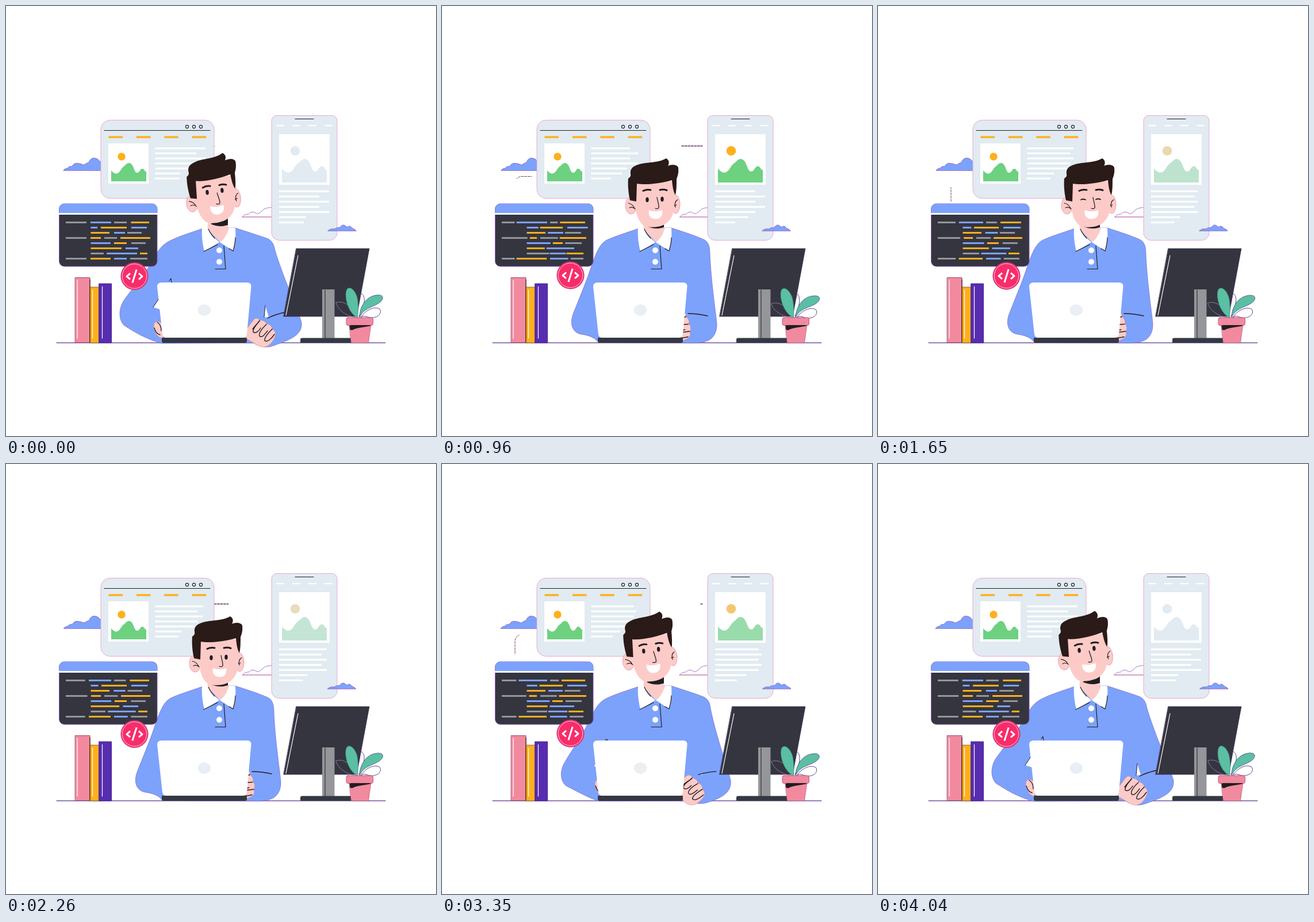
Recreate the animation shown at these times as an HTML page with a canvas. Size 748 by 748 pixels, loop 4080 ms.

```html
<!DOCTYPE html>
<html lang="en">
<head>
<meta charset="utf-8">
<title>Developer at work</title>
<style>
html, body { margin: 0; width: 100%; height: 100%; overflow: hidden; background: #fff; }
canvas { display: block; width: 748px; height: 748px; }
</style>
</head>
<body>
<canvas id="stage" width="748" height="748"></canvas>
<script>
const ctx = document.getElementById('stage').getContext('2d');
const LOOP = 4080, HALF = LOOP / 2;
const BLUE = '#7ca2fc', ORANGE = '#fdb01c', GREY = '#949699', DARK = '#353540', INK = '#211d22';
const PALE = '#e1ebf1', SKIN = '#fdcbc7', HAIR = '#2a1a18', PINK = '#f28a9f', GREEN = '#6dd180';
const LEAF = '#5abfa3', EDGE = '#8453bd', ROSE = '#ee9fce', WHITE = '#fff';

const lerp = (a, b, p) => a + (b - a) * p;
const clamp = p => Math.max(0, Math.min(1, p));
const smooth = p => (p = clamp(p), p * p * (3 - 2 * p));

function key(t, k) {
  for (let i = 2; i < k.length; i += 2)
    if (t < k[i]) return lerp(k[i - 1], k[i + 1], clamp((t - k[i - 2]) / (k[i] - k[i - 2])));
  return k[k.length - 1];
}

function blend(a, b, p) {
  return 'rgb(' + a.map((v, i) => Math.round(lerp(v, b[i], p))) + ')';
}

function fill(d, color, edge, width = 0.8) {
  const path = new Path2D(d);
  ctx.fillStyle = color;
  ctx.fill(path);
  if (edge) line(path, edge, width);
}

function line(d, color = INK, width = 1.3) {
  ctx.strokeStyle = color;
  ctx.lineWidth = width;
  ctx.stroke(d instanceof Path2D ? d : new Path2D(d));
}

function box(x, y, w, h, color, r = 0, edge) {
  ctx.beginPath();
  ctx.roundRect(x, y, w, h, r);
  ctx.fillStyle = color;
  ctx.fill();
  if (edge) { ctx.strokeStyle = edge; ctx.lineWidth = 0.9; ctx.stroke(); }
}

function oval(x, y, rx, ry, color, edge, width = 0.8) {
  ctx.beginPath();
  ctx.ellipse(x, y, rx, ry, 0, 0, 7);
  ctx.fillStyle = color;
  ctx.fill();
  if (edge) { ctx.strokeStyle = edge; ctx.lineWidth = width; ctx.stroke(); }
}

function moved(x, y, draw) {
  ctx.save();
  ctx.translate(x, y);
  draw();
  ctx.restore();
}

function turned(x, y, deg, draw) {
  ctx.save();
  ctx.translate(x, y);
  ctx.rotate(deg * Math.PI / 180);
  ctx.translate(-x, -y);
  draw();
  ctx.restore();
}

function hills(x, y, scale, color) {
  moved(x, y, () => {
    ctx.scale(scale, scale);
    fill('M0 13C3 16 5 18.5 9 18.5C15 18.5 17 9 22 6C25 4 27 0 31 0C40 1 39 17 45 17C50 17 50 9 55 10C58 11 58 15 61 15V32H0Z', color);
  });
}

// Draws the stretch from a to b of a dashed route given by at(s).
function trail(at, a, b, color, width) {
  ctx.beginPath();
  for (let s = 0; s < b; s += 5.5) {
    const from = Math.max(s, a), to = Math.min(s + 3.7, b);
    if (to <= from) continue;
    ctx.moveTo(...at(from));
    ctx.lineTo(...at(to));
  }
  ctx.strokeStyle = color;
  ctx.lineWidth = width;
  ctx.stroke();
}

const across = s => [362 + s, 243.5];
function bend(s) {
  if (s < 25) return [164 - s, 296.5];
  const turn = (s - 25) / 12;
  if (turn < Math.PI / 2) return [139 - 12 * Math.sin(turn), 308.5 - 12 * Math.cos(turn)];
  return [127, 308.5 + s - 25 - 6 * Math.PI];
}

function trails(t) {
  const h = t % HALF;
  if (h < 1390) {
    const tail = key(h, [250, 0, 430, 9, 790, 38, 960, 54, 1310, 87, 1360, 91]);
    const head = key(h, [0, 0, 430, 48, 790, 82, 960, 91]);
    trail(across, tail, head, '#5c2a5e', 1.4);
  }
  if (h > 600) {
    const tail = key(h, [700, 6, 960, 8, 1310, 30, 1650, 51, 2000, 80]);
    const head = key(h, [600, 5, 790, 25, 960, 35, 1310, 66, 1650, 75, 1800, 80]);
    trail(bend, tail, head, '#6b4566', 1);
  }
}

function backClouds(sway) {
  moved(3 * sway, 0, () => {
    fill('M100 286C102 283 105 282 108 282C109 278 113 279 115 279C118 273 123 273 127 274C132 274 134 278 138 275C141 272 143 274 145 270C148 264 153 264 156 265C162 266 163 272 168 273V286Z', BLUE, EDGE);
    line('M411 367C414 363 418 362 422 362C426 357 431 358 434 360C438 363 441 360 445 357C449 351 456 351 466 350', EDGE, 0.8);
    line('M411 367H466', '#b0428f', 1.1);
  });
}

function frontCloud(sway) {
  moved(-3 * sway, 0, () =>
    fill('M560 391C563 388 568 387 572 388C575 384 579 387 582 384C585 379 590 381 592 384C594 386 596 381 600 384C602 388 607 387 609 391Z', BLUE, EDGE));
}

function browser(w) {
  box(165, 198.5, 197, 136, PALE, 16, ROSE);
  line('M171 216.5H355', INK, 1.1);
  for (const x of [315, 327, 339]) oval(x, 210, 2.6, 2.6, PALE, INK, 1.1);
  for (let i = 0; i < 4; i++) box(178.5 + 48.4 * i, 226.3, 24.5, 3.5, ORANGE);
  box(178, 239, 70, 70, WHITE);
  oval(201, 262, 6.7, 6.7, ORANGE);
  hills(183, 273, 1, GREEN);
  const ends = [[347, 327], [331, 341], [347, 327], [331, 341], [331, 322], [303, 313], [302, 294]];
  ends.forEach(([a, b], i) => box(259.5, 246 + 8.75 * i, lerp(a, b, w) - 259.5, 3.2, WHITE));
}

function phone(w, glow) {
  box(462, 190.5, 114, 217, PALE, [9, 9, 13, 13], ROSE);
  line('M503 196.5H535', INK, 1);
  for (let i = 0; i < 4; i++) box(470 + 28 * i, 207, 14, 2.2, WHITE);
  box(475, 223, 88, 88, WHITE);
  const pale = [225, 235, 241];
  oval(503, 252, 8.3, 8.3, blend(pale, [253, 176, 28], glow));
  hills(480, 266, 1.28, blend(pale, [109, 209, 128], glow));
  const ends = [[562, 545], [545, 562], [562, 545], [545, 562], [562, 545], [522, 533], [518, 510]];
  ends.forEach(([a, b], i) => box(475, 320.7 + 9 * i, lerp(a, b, w) - 475, 3.2, WHITE));
}

// Each bar: colour, start, end, and how far both ends shift.
function codeRow(y, w, ...bars) {
  for (const [color, a, b, da, db] of bars)
    box(a + da * w, y, b - a + (db - da) * w, 3, color);
}

function editor(w) {
  box(92.5, 344, 170.5, 109, DARK, 9, EDGE);
  box(92.5, 344, 170.5, 16, BLUE, [9, 9, 0, 0]);
  box(92, 360, 172, 3, WHITE);
  codeRow(375, w, [GREY, 104, 140, 0, -14], [BLUE, 147, 183, -18, 0], [GREY, 188, 210, 0, -9], [ORANGE, 217.5, 249, -12.5, 0]);
  codeRow(384, w, [BLUE, 147.5, 159, 0, 9], [ORANGE, 165, 210, 6, 0], [BLUE, 218, 245, 0, 9]);
  codeRow(393, w, [ORANGE, 147.5, 180, 0, 0], [BLUE, 188, 207, -4, 4], [GREY, 211, 236, 3, 6]);
  codeRow(402, w, [GREY, 104, 140, 0, 9], [ORANGE, 147, 165, 6, 0], [GREY, 171, 193, 0, 9], [ORANGE, 199, 251, 6, 0]);
  codeRow(411, w, [BLUE, 147.5, 182, 0, 7], [ORANGE, 188, 210, 5, 0], [GREY, 218, 243, -4, 0]);
  codeRow(420, w, [ORANGE, 147.5, 201, 0, -23], [BLUE, 208, 230, -27, 0]);
  codeRow(429, w, [GREY, 147.5, 170, 0, 17], [BLUE, 175, 228, 13, -13], [ORANGE, 233, 246, -17, 0]);
  codeRow(438, w, [GREY, 104, 140, 0, -14], [ORANGE, 147, 182, -18, 0], [BLUE, 188, 210, 0, 10], [GREY, 216, 246, 8, 0]);
}

function badge(sway) {
  moved(223.5, 470 - 1.6 * sway, () => {
    oval(0, 0, 23.7, 23.7, '#f72d6a', '#b0428f');
    oval(0, 0, 21.3, 21.3, '#f72d6a', '#ffd3e0', 0.9);
    ctx.lineCap = 'butt';
    line('M-7.5 -5L-13.5 0.3L-7.5 5.5M7.5 -5L13.5 0.3L7.5 5.5M3.6 -11.5L-3.6 11.5', WHITE, 3);
    ctx.lineCap = 'round';
  });
}

function books() {
  box(120.5, 472.5, 25.5, 113, PINK, 0, '#8a3d63');
  box(146, 489, 16, 97, ORANGE, 0, '#8a5a2c');
  box(162, 483, 21.5, 103, '#572db0', 0, '#3c1c86');
  line('M146 476V585', INK, 1);
  line('M124 477V578M150.5 494V578M167.5 488V578', WHITE, 1.2);
}

function monitor() {
  fill('M505 422H632L610 540H483Z', DARK, '#3b2755');
  line('M508 434L487 538', WHITE, 1.2);
  box(550, 493, 21.5, 85, GREY);
  line('M555 494V577', INK, 1);
  box(512, 577.5, 89, 8.5, '#343842', [3, 0, 0, 0]);
}

function plant(sway) {
  const stem = '#4a2f86';
  turned(612, 542, -3 * sway, () => {
    line('M609 542C596 541 577 530 574 516C586 512 602 520 609 542', '#8d83b0', 0.9);
    line('M612 540C605 520 609 504 617 500C625 502 627 516 614 540', stem, 0.9);
    fill('M611 542C593 532 588 502 593 493C599 485 611 498 612 514C613 526 613 535 611 542Z', LEAF, '#3e8f80', 0.7);
  });
  turned(615, 542, 2.5 * sway, () => {
    line('M617 542C624 530 640 521 650 527C655 535 646 543 634 542C627 541 622 537 617 542', stem, 0.9);
    fill('M615 542C615 522 627 505 644 503C656 501 658 508 652 514C640 525 623 523 615 542Z', LEAF, stem, 0.7);
  });
  fill('M597 554H635L630.5 586H600.5Z', PINK, '#9c4668', 0.6);
  fill('M597.5 556H636C624 559 611 559 602 564L598.5 563Z', INK);
  box(592, 542, 46.5, 13.5, PINK, 3, '#b04f78');
  line('M600 555.5H633', INK, 0.9);
}

const armsOut = [282, 410, 268, 418, 262, 430, 252, 447, 240, 470, 222, 488, 208, 508, 195, 524, 195, 546, 206, 556,
  222, 566, 240, 578, 271, 587, 320, 587, 380, 586, 430, 586, 440, 592, 450, 595, 462, 592,
  490, 582, 517, 574, 514, 550, 508, 528, 482, 472, 468, 425, 466, 414, 463, 409, 456, 405];
const armsIn = [285, 408, 272, 416, 266, 436, 258, 458, 250, 482, 238, 510, 228, 536, 222, 552, 226, 568, 242, 571,
  255, 573, 265, 576, 272, 585, 320, 586, 380, 586, 417, 586, 430, 586, 440, 587, 452, 585,
  470, 583, 479, 570, 478, 552, 477, 538, 468, 480, 466, 430, 466, 416, 462, 409, 455, 406];

function torso(b) {
  const n = armsOut.map((v, i) => lerp(v, armsIn[i], b).toFixed(2));
  fill(`M342 387C322 394 296 402 ${n[0]} ${n[1]}C${n.slice(2).join(' ')}C440 399 420 393 399 386Z`, BLUE, EDGE, 0.6);

  const gap = clamp((0.45 - b) / 0.45);
  if (gap > 0) {
    moved(267, 526, () => {
      ctx.scale(gap, gap);
      fill('M-11 -2L-1 -17L2 2Z', WHITE);
      line('M-11 -2L-1 -17', INK, 1);
    });
    moved(451, 541, () => {
      ctx.scale(gap, gap);
      fill('M-2 1L0 -20L6 0Z', WHITE);
      line('M-2 1L0 -20', INK, 1);
    });
    line(`M288 481L287 ${481 - 7 * gap}L284 ${481 - 3 * gap}`, INK, 1.1);
  }
  const c = [455, 543, 467, 537, 484, 533].map((v, i) => lerp(v, [428, 535, 444, 535, 462, 539][i], b));
  line(`M${c[0]} ${c[1]}Q${c.slice(2).join(' ')}`, INK, 1.3);
}

function hands(b) {
  turned(441.5, 521, 41 * b, () => {
    fill('M414 568L430 547C433 541 440 543 441 547C446 546 452 549 453 553C459 553 463 558 463 562C469 565 470 570 467 577C463 586 456 594 447 593C440 594 432 585 414 577Z', SKIN, '#c98b8d', 0.6);
    line('M429 562C433 556 438 552 441 547M441 548C435 555 429 562 430 567C434 571 440 565 443 560M453 554C446 560 439 569 441 574C445 579 452 569 455 565M463 562C456 569 449 577 450 582C455 586 463 577 467 571', INK, 1.4);
  });
  moved(28 * b, 0, () => {
    fill('M258 552C262 546 270 549 273 556V578C263 578 254 562 258 552Z', SKIN, '#c98b8d', 0.6);
    line('M263 550C268 553 270 559 270 565M258 560C260 568 264 571 268 572', INK, 1.3);
  });
}

function collar(tilt) {
  fill('M352 374H386V388L392 390L372 411L350 387Z', SKIN);
  moved(0, -4 * tilt, () => fill('M356 383L386 366V385C376 388 366 388 356 383Z', INK));
  fill('M341 386L351 386C356 397 363 404 371 411L345 427C342 414 340 400 341 386Z', WHITE);
  fill('M387 386L399 386C400 400 399 414 395 426L372 411C380 404 386 396 387 386Z', WHITE);
  line('M352 388C355 395 359 400 363 404M344 427L368 415M399 403C399 412 397 419 395 426L388 422', INK, 1.2);
  line('M379 417L382 457.5H364', INK, 1.2);
  oval(371, 425, 5, 5, WHITE);
  oval(371, 445, 5, 5, WHITE);
}

function eyes(shut) {
  if (shut > 0.75) {
    line('M353 337Q357 335 361 337M379 336.5Q383 334.5 387 336.5', INK, 1.8);
    return;
  }
  oval(357, 337, 2.7, 4.2 * (1 - shut), INK);
  oval(383, 336, 2.7, 4.2 * (1 - shut), INK);
}

function head(tilt, shut) {
  moved(-tilt, -8 * tilt, () => turned(372, 393, -5.5 * tilt, () => {
    oval(329, 347, 10, 15, SKIN, '#e38fae');
    oval(406.5, 345, 7.5, 16, SKIN, '#e38fae');
    fill('M335 305H406V340C405 360 398 374 387 380C377 385.5 362 386 352 383C342 376 337 362 336 345Z', SKIN);
    line('M324 343C329 344 333 347 335 352M326 351C330 349 333 350 336 353M410 337C406 339 404 344 406 350M404 347L408 346', INK, 1.2);
    fill('M327 338C324 325 323 311 324 300C327 298 329 296 328 292C327 284 331 279 341 276C354 271 375 274 390 265C395 268 396 273 393 278C401 275 409 276 411 281C412 290 410 296 408 301C408 311 408 321 406 329C402 322 401 313 400 303C382 308 357 312 339 309L338 340Z', HAIR);
    line('M350 321.5C354 319.5 359 319 363 320M379 320C383 319 387 319 391 320.5', INK, 3);
    line('M374 333C375 340 378 347 377 351C376 353 373 353 371 352', INK, 1.3);
    fill('M360 355C367 358 376 358 383 355C385 365 379 371 371 370.5C363 370 358 364 360 355Z', WHITE);
    moved(0, -6.5 * tilt, () => eyes(shut));
  }));
}

function laptop() {
  fill('M271 481H419Q427 481 426.5 488L419 571Q418 577 412 577H279Q273 577 272 571L263 488Q263 481 271 481Z', WHITE);
  oval(345, 529, 11.3, 10, '#e9eff4');
  box(271, 577, 148, 9, '#343842', [1, 1, 3, 3]);
}

function draw(t) {
  const h = t % HALF;
  const p = 1 - Math.abs(h / 1020 - 1);
  const sway = (p + smooth(p)) / 2;
  const slide = key(h, [0, 0, 960, 1, 2000, 0]);
  const glow = key(h, [0, 0, 430, 0.48, 790, 0.95, 900, 1, 980, 1, 1310, 0.61, 1650, 0.31, 2000, 0]);
  const arms = smooth(t / 860) - smooth((t - 2830) / 845);
  const tilt = 1 - smooth(t / 750) + smooth((t - 2630) / 900);
  const shut = clamp(2 - Math.abs(t - 1650) / 55);

  ctx.fillStyle = WHITE;
  ctx.fillRect(0, 0, 748, 748);
  ctx.lineCap = ctx.lineJoin = 'round';
  backClouds(sway);
  trails(t);
  browser(slide);
  phone(slide, glow);
  frontCloud(sway);
  line('M88 585.8H660', '#5b3591', 1.2);
  books();
  torso(arms);
  collar(tilt);
  head(tilt, shut);
  hands(arms);
  laptop();
  editor(sway);
  badge(sway);
  monitor();
  plant(sway);
}

function tick(now) {
  draw(now % LOOP);
  requestAnimationFrame(tick);
}
draw(0);
requestAnimationFrame(tick);
</script>
</body>
</html>
```
